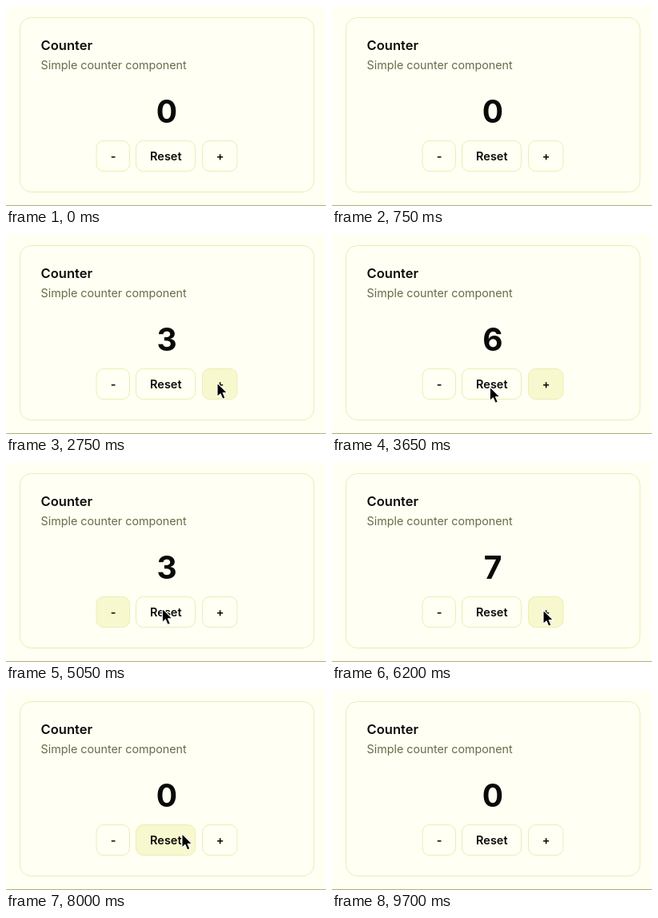
Recreate the animation shown at these times as an HTML page. Size 400x250 px, loop 9750 ms.

```html
<!DOCTYPE html>
<html lang="en">
<head>
<meta charset="utf-8">
<title>Counter</title>
<style>
  html, body { margin: 0; width: 100%; height: 100%; overflow: hidden; background: #fffff3; }
  svg { display: block; width: 400px; height: 250px; font-family: Inter, "Liberation Sans", sans-serif; fill: #0a0a08; }
  .box { fill: none; stroke: #ededb4; }
  .hover { fill: #f8f8cf; }
  .mid { text-anchor: middle; }
  .label { font-size: 14.5px; font-weight: 600; }
</style>
</head>
<body>
<svg viewBox="0 0 400 250">
  <rect width="400" height="250" fill="#fffff3"/>
  <rect y="249" width="400" height="1" fill="#b0b078"/>
  <rect class="box" x="17.5" y="14.5" width="367.5" height="218" rx="14"/>
  <text x="43.6" y="55" font-size="16.5" font-weight="600">Counter</text>
  <text x="43.6" y="79" font-size="14.3" fill="#6a6a48">Simple counter component</text>
  <text id="count" class="mid" x="201" y="145.5" font-size="39" font-weight="700">0</text>
  <g id="buttons"></g>
  <path id="cursor" d="M0 0V17.5L4 13.8L6.8 20.3L10 19L7.2 12.6H12.6Z" fill="#000" stroke="#fff" stroke-width="1.1" stroke-linejoin="round"/>
</svg>
<script>
  const LOOP = 9750, HIDE = 8600;
  const HOVER_LAG = 150, CLICK_GAP = 270;
  const TOP = 168.5, HEIGHT = 38;
  const $ = id => document.getElementById(id);
  const clamp = (v, lo, hi) => Math.min(hi, Math.max(lo, v));
  const smooth = u => u * u * (3 - 2 * u);

  const buttons = [
    { label: '-', x: 113, w: 41.5 },
    { label: 'Reset', x: 162.5, w: 74 },
    { label: '+', x: 245.5, w: 43.5 }
  ];

  // The cursor glides from one stop to the next; bow bends the path
  const entry = { x: 400, y: 252 };
  const stops = [
    { at: 1300, dur: 400, x: 264, y: 186, bow: 0 },
    { at: 3500, dur: 300, x: 132, y: 189, bow: 3.5 },
    { at: 4905, dur: 300, x: 264, y: 185, bow: -4 },
    { at: 6950, dur: 300, x: 200, y: 189, bow: 0 },
    { at: 7880, dur: 400, x: 291, y: 146, bow: 0 }
  ];

  // Evenly spaced clicks while the cursor rests on a button
  const bursts = [
    { at: 1950, clicks: 6, step: 1 },
    { at: 4100, clicks: 3, step: -1 },
    { at: 5300, clicks: 6, step: 1 }
  ];
  const RESET = 7500;

  $('buttons').innerHTML = buttons.map(({ label, x, w }) => {
    const box = `x="${x}" y="${TOP}" width="${w}" height="${HEIGHT}" rx="9"`;
    return `<rect class="hover" ${box}/><rect class="box" ${box}/>` +
      `<text class="mid label" x="${x + w / 2 + 0.3}" y="193">${label}</text>`;
  }).join('');
  const fills = document.querySelectorAll('.hover');

  function cursorAt(t) {
    const i = Math.max(0, stops.filter(s => s.at <= t).length - 1);
    const from = i ? stops[i - 1] : entry, to = stops[i];
    const s = smooth(clamp((t - to.at) / to.dur, 0, 1));
    return {
      x: from.x + (to.x - from.x) * s,
      y: from.y + (to.y - from.y) * s + to.bow * 4 * s * (1 - s)
    };
  }

  function countAt(t) {
    if (t >= RESET) return 0;
    return bursts.reduce((sum, { at, clicks, step }) =>
      sum + step * clamp(Math.floor((t - at) / CLICK_GAP) + 1, 0, clicks), 0);
  }

  const inside = (p, b) =>
    p.x >= b.x && p.x <= b.x + b.w && p.y >= TOP && p.y <= TOP + HEIGHT;

  function render(t) {
    const tip = cursorAt(t), felt = cursorAt(t - HOVER_LAG);
    $('count').textContent = countAt(t);
    buttons.forEach((b, i) => { fills[i].style.opacity = inside(felt, b) ? 1 : 0; });
    $('cursor').setAttribute('transform', `translate(${tip.x} ${tip.y})`);
    $('cursor').style.visibility = t >= stops[0].at && t < HIDE ? 'visible' : 'hidden';
  }

  const begin = performance.now();
  function frame() {
    render((performance.now() - begin) % LOOP);
    requestAnimationFrame(frame);
  }
  frame();
</script>
</body>
</html>
```
